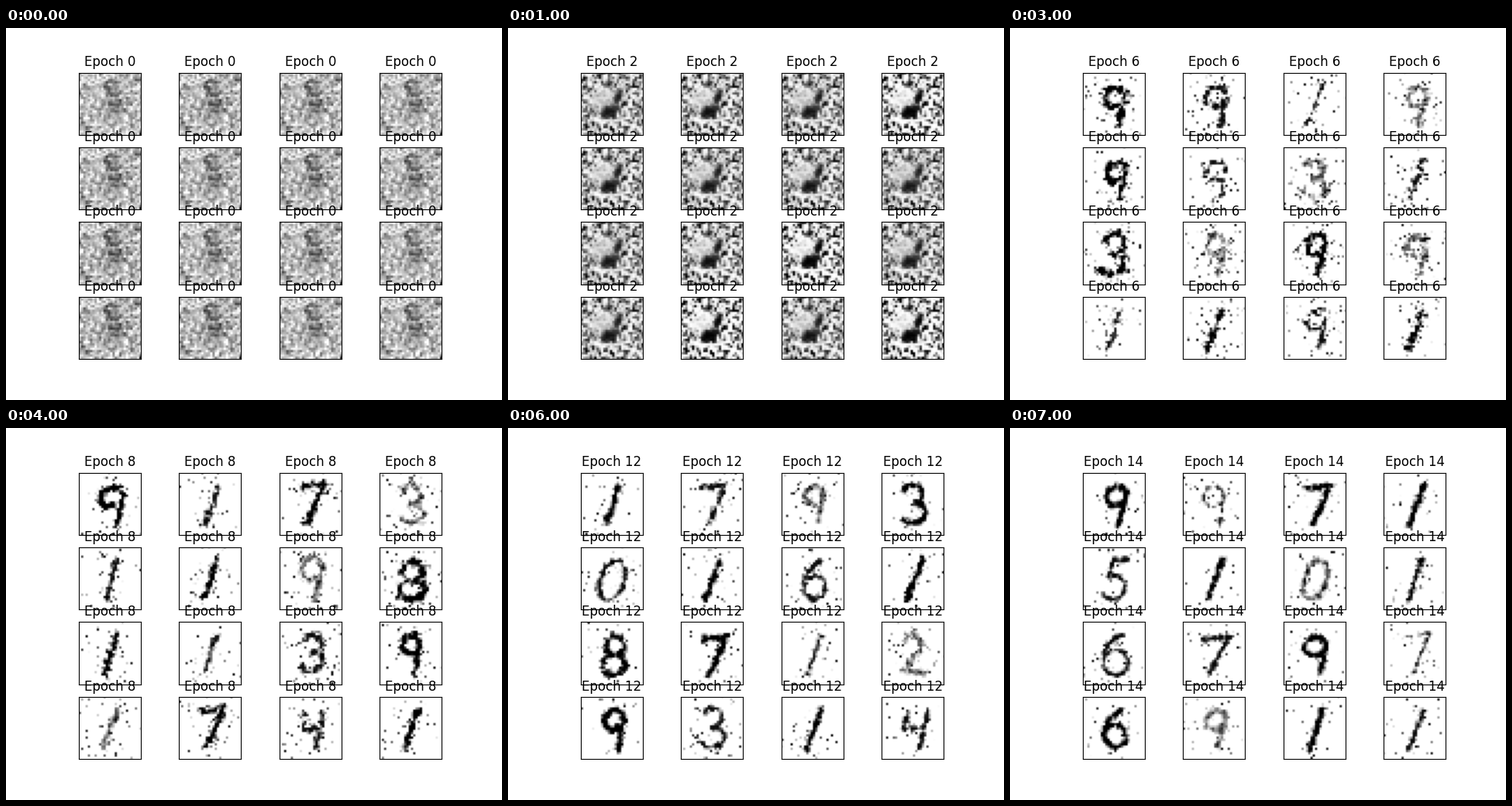
A matplotlib script that plays this animation: 640 by 480 pixels, repeating every 8000 ms.

```python
import numpy as np
import matplotlib.pyplot as plt
from matplotlib.animation import FuncAnimation

SIZE = 28
CELLS = 16
SHAPE = (SIZE, SIZE)
X, Y = np.meshgrid(np.arange(SIZE) + 0.5, np.arange(SIZE) + 0.5)


def arc(cx, cy, rx, ry, start=0, end=360):
    t = np.radians(np.linspace(start, end, 60))
    return np.column_stack([cx + rx * np.cos(t), cy + ry * np.sin(t)])


def line(x0, y0, x1, y1):
    return np.linspace((x0, y0), (x1, y1), 40)


# Digits in the box from -1 to 1, y pointing down
GLYPHS = {
    "0": [arc(0, 0, 1, 1)],
    "1": [line(0, -1, 0, 1)],
    "2": [arc(0, -.5, .8, .5, -160, 50), line(.5, -.1, -1, .9),
          line(-1, .9, 1, .95)],
    "3": [arc(-.1, -.5, .8, .5, -150, 90), arc(-.1, .5, 1, .5, -90, 150)],
    "4": [line(-.8, -.8, -.9, 0), line(-.9, 0, .7, 0), line(.9, -.9, .5, 1)],
    "5": [line(-.5, -1, .7, -1), line(-.5, -1, -.6, -.1),
          arc(-.2, .4, 1, .6, -110, 140)],
    "6": [arc(0, .4, 1, .6), arc(.9, .4, 1.9, 1.4, 180, 260)],
    "7": [line(-1, -.85, .9, -1), line(.9, -1, -.1, 1)],
    "8": [arc(0, -.5, .8, .5), arc(0, .5, 1, .5)],
    "9": [arc(-.1, -.45, .85, .5), line(.75, -.6, .5, 1)],
}
SLANT = {"0": 1.5, "1": 3, "7": 1, "9": 1}

# Half width of the stroke and darkness: bold, medium, thin, soft
PENS = {"b": (1.35, 1), "m": (1, .95), "t": (.55, .9), "s": (1.25, .6)}


def distance(points):
    gap = np.hypot(X[..., None] - points[:, 0], Y[..., None] - points[:, 1])
    return gap.min(axis=-1)


def blob(x, y, rx, ry, tilt=0):
    c, s = np.cos(tilt), np.sin(tilt)
    u, v = (X - x) * c + (Y - y) * s, (Y - y) * c - (X - x) * s
    return np.exp(-((u / rx) ** 2 + (v / ry) ** 2) ** 2)


def grain(rng, clump=.5):
    """Unit noise in which neighbours resemble each other."""
    n = rng.normal(size=SHAPE)
    n = n + clump * np.roll(n, 1, 0)
    n = n + clump * np.roll(n, 1, 1)
    return n / (1 + clump ** 2)


def sigmoid(z):
    return 1 / (1 + np.exp(-np.clip(z, -50, 50)))


def noise_page():
    """A faint ring and body in even noise."""
    rng = np.random.default_rng(3)
    ring = np.exp(-((np.hypot(X - 14, Y - 6) - 2.2) / 1.3) ** 2)
    body = blob(15.5, 14, 4, 7, .2)
    calm = blob(18.5, 20, 2, 4) + blob(7, 9, 3, 3)
    base = .26 + .17 * grain(rng, .3) * (1 - .6 * calm)
    base += .2 * ring + .17 * body + .1 * blob(17, 13, 2, 5)
    base[-1, -1] = .95
    return [base * rng.uniform(.94, 1.04) + .015 * rng.normal(size=SHAPE)
            for _ in range(CELLS)]


def blob_page():
    """Two dark blobs in strong noise that is calmer to the left."""
    rng = np.random.default_rng(8)
    calm = blob(11, 12, 7, 6)
    base = .34 + .27 * grain(rng, .35) * (1 - .75 * calm) - .08 * calm
    marks = np.maximum(blob(12.7, 17.6, 4, 3, -.45),
                       blob(16.7, 11.2, 1.6, 2.9, .5))
    base += marks * (.86 + .06 * grain(rng) - base)
    base += .25 * blob(11.5, 5.3, 2.6, 1.7)
    gains = rng.uniform(5, 7, CELLS)
    gains[[3, 10, 13, 15]] = 10
    return [sigmoid(k * (base - .5)) for k in gains]


def cluster_page():
    """A ragged 3 whose contrast differs from cell to cell."""
    rng = np.random.default_rng(21)
    d = distance(np.vstack([line(10.5, 6, 18, 5.5), line(10.5, 14, 16, 14),
                            line(16, 7, 13, 12), arc(13, 19, 4.5, 4, -60, 70)]))
    field = np.exp(-(d / 2.3) ** 2)
    base = .17 + .1 * grain(rng) + field * (.4 + .2 * grain(rng, .3))
    base += .2 * blob(15.5, 22.5, 2.3, 1.6) + .15 * blob(12.5, 14, 2.5, 2)
    base += (rng.random(SHAPE) < .03) * rng.uniform(.1, .55, SHAPE)
    sharp = rng.uniform(-.03, .06, CELLS)
    sharp[[0, 14]] = .2
    sharp[4] = .5
    sharp[[12, 15]] = 1
    return [sigmoid((6.5 + 40 * s) * (base - .5 - .1 * s)) for s in sharp]


def paint(rng, digit, pen, rough, specks):
    width, tone = PENS[pen]
    slant = SLANT.get(digit, .3) + rng.uniform(-.6, .6)
    u, v = np.vstack(GLYPHS[digit]).T
    half_w, half_h = rng.uniform(4.6, 5.8), rng.uniform(8, 9)
    cx, cy = rng.uniform(14, 15), rng.uniform(14, 15)
    d = distance(np.column_stack([cx + half_w * u - slant * v,
                                  cy + half_h * v]))

    ink = np.clip(width + .4 - d + rough * grain(rng), 0, 1) * (d < width + 2)
    ink *= tone + (1 - tone) * .5 * grain(rng)
    near = .4 + 1.6 * np.exp(-(d / 7) ** 2)
    dots = (rng.random(SHAPE) < specks * near) * rng.random(SHAPE)
    return np.clip(np.maximum(ink, dots), 0, 1)


def digit_page(epoch, digits, pens):
    """Strokes get cleaner and specks rarer as the epochs go by."""
    rng = np.random.default_rng(epoch)
    rough, specks = .85 - .033 * epoch, .07 - .003 * epoch
    return [paint(rng, d, p, rough, specks) for d, p in zip(digits, pens)]


pages = [
    noise_page(),
    blob_page(),
    cluster_page(),
    digit_page(6, "9919993139991191", "bmtsbtsmbsbstbmb"),
    digit_page(8, "9173119811391741", "bmbsmbsbbmmbsbmb"),
    digit_page(10, "1717911823142141", "sbbbmbmbmmtmbbsb"),
    digit_page(12, "1793016187129314", "bmsbmbmbbbmsbmbm"),
    digit_page(14, "9971510167976911", "btbbmbsbmmbtbsbm"),
]

fig, axes = plt.subplots(4, 4, figsize=(6.4, 4.8), dpi=100)
images = []
for ax in axes.flat:
    ax.set_xticks([])
    ax.set_yticks([])
    images.append(ax.imshow(np.zeros(SHAPE), cmap="gray_r", vmin=0, vmax=1))


def update(i):
    for ax, image, data in zip(axes.flat, images, pages[i]):
        image.set_data(np.clip(data, 0, 1))
        ax.set_title(f"Epoch {2 * i}")
    return images


anim = FuncAnimation(fig, update, frames=len(pages), interval=1000,
                     repeat=True, blit=False)
plt.show()
```
